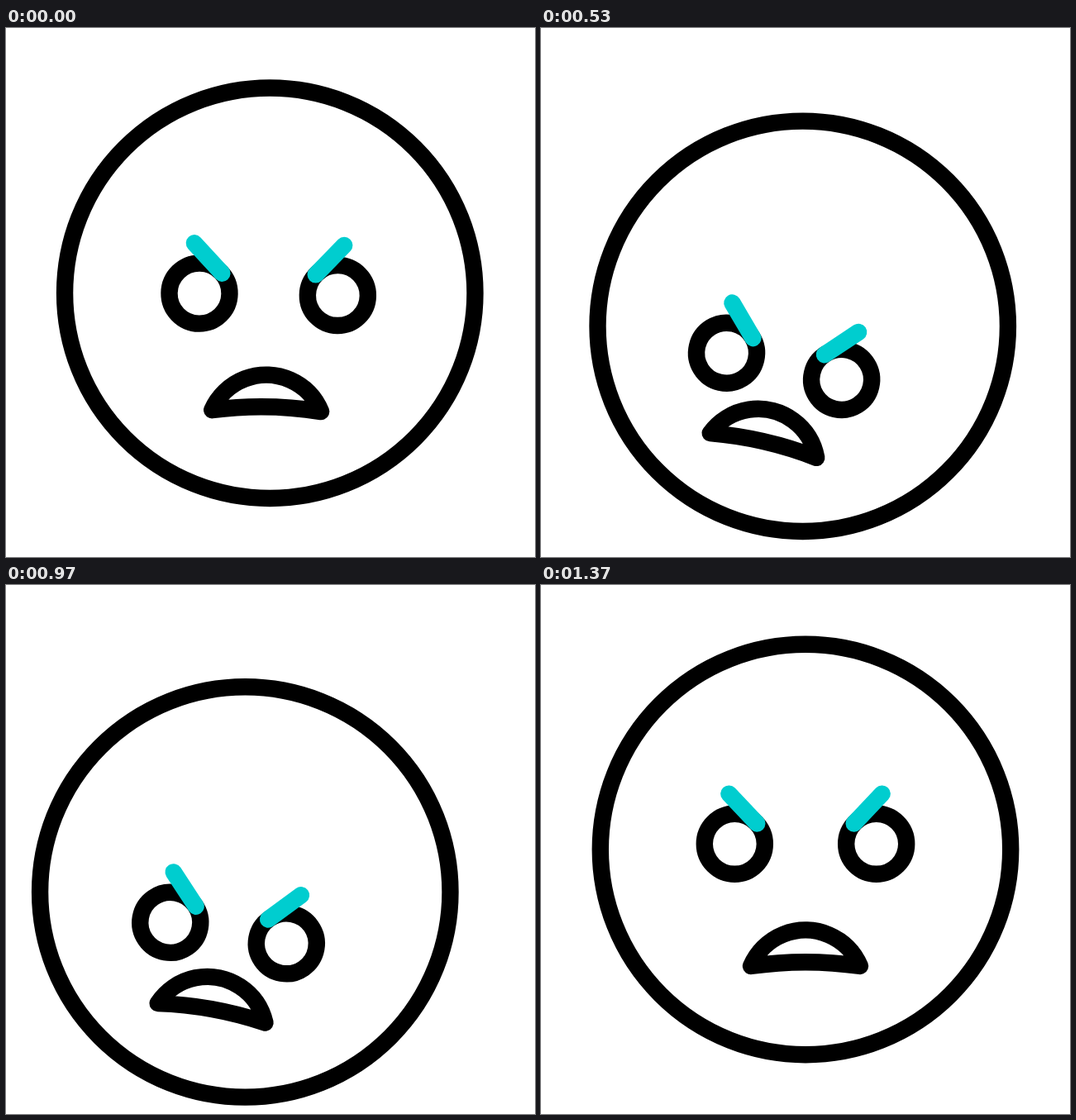
An HTML page with a canvas that plays this animation: 640 by 640 pixels, repeating every 1.67 s.

```html
<!DOCTYPE html>
<html lang="en">
<head>
<meta charset="utf-8">
<title>Angry face</title>
<style>
  html, body { margin: 0; width: 100%; height: 100%; overflow: hidden; background: #fff; }
  canvas { display: block; }
</style>
</head>
<body>
<canvas id="stage" width="640" height="640"></canvas>
<script>
const ctx = document.getElementById('stage').getContext('2d');
const LOOP = 1670;
const STEP = 1000 / 30;
const LAST_STEP = 41;
const LINE = 20.4;
const INK = '#000';
const TEAL = '#00cdcf';

// Head shake: [step, x, y, face tilt in degrees]
const SHAKE = [
  [-0.75, 320, 320, 0],
  [7.9, 285.3, 354.7, 39.8],
  [13.75, 353.5, 362.5, -5.1],
  [18.4, 276.2, 358.9, 33],
  [23.2, 353.5, 370.9, -27.7],
  [28.2, 285.6, 371.1, 11.9],
  [34.2, 361.4, 378.7, -22],
  [41, 320, 320, 0]
];

// Lowered look: [step, amount]
const FROWN = [[-2.1, 0], [6.8, 1], [29.9, 1], [41, 0]];

const mix = (a, b, p) => a + (b - a) * p;
const smooth = u => u * u * (3 - 2 * u);

function sample(keys, step) {
  let i = 0;
  while (i < keys.length - 2 && step >= keys[i + 1][0]) i++;
  const [from, ...a] = keys[i];
  const [to, ...b] = keys[i + 1];
  const p = smooth(Math.min(1, (step - from) / (to - from)));
  return a.map((value, k) => mix(value, b[k], p));
}

function ring(x, y, r) {
  ctx.beginPath();
  ctx.arc(x, y, r, 0, 2 * Math.PI);
  ctx.stroke();
}

// side is -1 for left, 1 for right
function eye(x, y, side) {
  ctx.save();
  ctx.translate(x, y);
  ctx.scale(side, 1);
  ctx.strokeStyle = INK;
  ring(0, 0, 36.5);
  ctx.strokeStyle = TEAL;
  ctx.beginPath();
  ctx.moveTo(7, -60.7);
  ctx.lineTo(-27, -24.8);
  ctx.stroke();
  ctx.restore();
}

function mouth(x, y) {
  const half = 66, rise = 43.5;
  const radius = (half * half + rise * rise) / (2 * rise);
  const drop = radius - rise;
  const angle = Math.atan2(drop, half);
  ctx.strokeStyle = INK;
  ctx.beginPath();
  ctx.arc(x, y + drop, radius, Math.PI + angle, 2 * Math.PI - angle);
  ctx.quadraticCurveTo(x, y - 9.6, x - half, y);
  ctx.closePath();
  ctx.stroke();
}

function draw(step) {
  const [x, y, tilt] = sample(SHAKE, step);
  const [frown] = sample(FROWN, step);
  ctx.fillStyle = '#fff';
  ctx.fillRect(0, 0, 640, 640);
  ctx.lineWidth = LINE;
  ctx.lineCap = ctx.lineJoin = 'round';

  ctx.save();
  ctx.translate(x, y);
  ctx.strokeStyle = INK;
  ring(0, 0, 248.2);
  ctx.rotate(tilt * Math.PI / 180);
  const eyeX = mix(0, -11.1, frown);
  const eyeY = mix(-6.7, 52.4, frown);
  const gap = mix(85.7, 71.4, frown);
  for (const side of [-1, 1]) eye(eyeX + side * gap, eyeY, side);
  mouth(mix(0, -14, frown), mix(141, 151.3, frown));
  ctx.restore();
}

function tick() {
  const time = performance.now() % LOOP;
  draw(Math.min(LAST_STEP, Math.floor((time + 4) / STEP)));
  requestAnimationFrame(tick);
}
tick();
</script>
</body>
</html>
```
